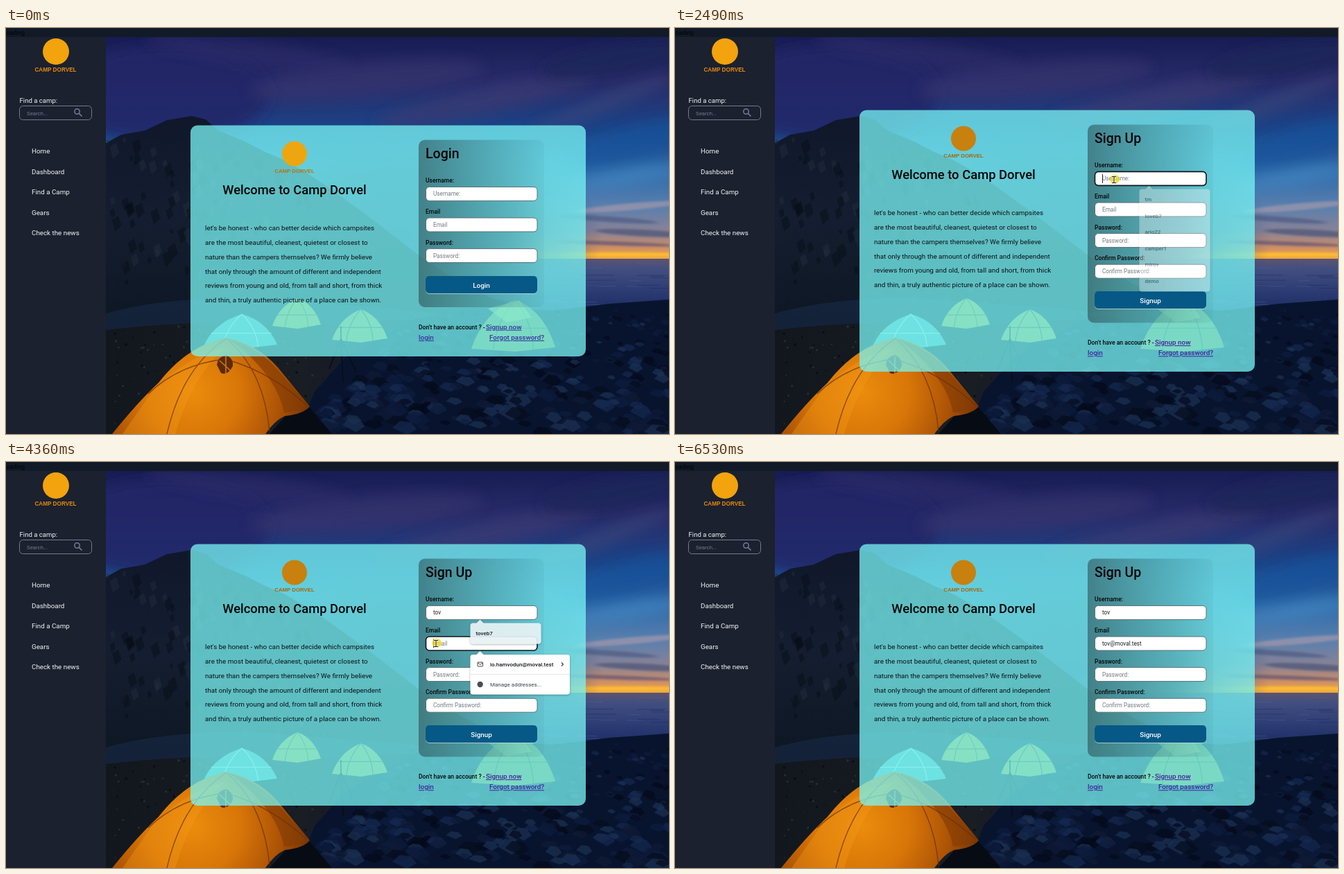
Write an HTML page that moves like this. It is 956 px wide and 586 px high and loops after 8 s.

```html
<!DOCTYPE html>
<html lang="en">
<head>
<meta charset="utf-8">
<title>Camp login</title>
<style>
html, body { margin: 0; width: 100%; height: 100%; overflow: hidden; background: #111a26; }
svg { display: block; width: 956px; height: 586px; }
text { font-family: Roboto, "Open Sans", sans-serif; white-space: pre; }
.mark { font-family: "Liberation Sans", Arial, sans-serif; font-weight: 700; }
</style>
</head>
<body>
<svg viewBox="0 0 956 586" xmlns="http://www.w3.org/2000/svg">
  <defs>
    <linearGradient id="sky" x1="0" y1="13" x2="0" y2="333" gradientUnits="userSpaceOnUse">
      <stop offset="0" stop-color="#171c54"/><stop offset=".2" stop-color="#282c69"/>
      <stop offset=".42" stop-color="#1b4488"/><stop offset=".6" stop-color="#2c68a8"/>
      <stop offset=".76" stop-color="#587fae"/><stop offset=".88" stop-color="#8b8296"/>
      <stop offset=".95" stop-color="#cf8f66"/><stop offset="1" stop-color="#f2aa38"/>
    </linearGradient>
    <linearGradient id="sea" x1="0" y1="333" x2="0" y2="430" gradientUnits="userSpaceOnUse">
      <stop offset="0" stop-color="#5d5470"/><stop offset=".15" stop-color="#414e80"/>
      <stop offset=".55" stop-color="#283870"/><stop offset="1" stop-color="#132150"/>
    </linearGradient>
    <radialGradient id="haze">
      <stop offset="0" stop-color="#24406e"/><stop offset=".55" stop-color="#24406e" stop-opacity=".85"/>
      <stop offset="1" stop-color="#24406e" stop-opacity="0"/>
    </radialGradient>
    <linearGradient id="hill" x1="0" y1="127" x2="0" y2="420" gradientUnits="userSpaceOnUse">
      <stop offset="0" stop-color="#10172a"/><stop offset=".5" stop-color="#141e30"/><stop offset="1" stop-color="#0d1724"/>
    </linearGradient>
    <linearGradient id="ground" x1="144" y1="0" x2="620" y2="0" gradientUnits="userSpaceOnUse">
      <stop offset="0" stop-color="#12171e"/><stop offset=".6" stop-color="#191d24"/><stop offset="1" stop-color="#0a1430"/>
    </linearGradient>
    <radialGradient id="glow" cx="270" cy="525" r="170" gradientUnits="userSpaceOnUse">
      <stop offset="0" stop-color="#ec8c0c"/><stop offset=".4" stop-color="#d87608"/>
      <stop offset=".75" stop-color="#ab5206"/><stop offset="1" stop-color="#733206"/>
    </radialGradient>
    <linearGradient id="panel">
      <stop offset="0" stop-color="#2a4c52" stop-opacity=".58"/><stop offset=".55" stop-color="#2a5a60" stop-opacity=".3"/>
      <stop offset="1" stop-color="#2a5a60" stop-opacity=".06"/>
    </linearGradient>
    <filter id="soft" x="-30%" y="-60%" width="160%" height="220%"><feGaussianBlur stdDeviation="9"/></filter>
    <filter id="thin" x="-20%" y="-150%" width="140%" height="400%"><feGaussianBlur stdDeviation="4 1.5"/></filter>
    <filter id="shade" x="-10%" y="-20%" width="120%" height="150%"><feDropShadow dx="0" dy="1" stdDeviation="1.5" flood-opacity=".35"/></filter>
    <clipPath id="view"><rect x="144" y="13" width="812" height="573"/></clipPath>
  </defs>
  <rect width="956" height="586" fill="#111a26"/>
  <g id="photo" clip-path="url(#view)"></g>
  <g id="side"></g>
  <g id="ui"></g>
</svg>
<script>
const LOOP = 8000;
const $ = id => document.getElementById(id);
const clamp = v => Math.max(0, Math.min(1, v));

let seed = 11;
const rnd = (a = 0, b = 1) => {
  seed = (seed * 16807) % 2147483647;
  return a + (b - a) * seed / 2147483647;
};

const rect = (x, y, w, h, r, fill, extra = '') =>
  `<rect x="${x}" y="${y}" width="${w}" height="${h}" rx="${r}" fill="${fill}" ${extra}/>`;
const path = (d, fill, extra = '') => `<path d="${d}" fill="${fill}" ${extra}/>`;
const line = (d, color, w = 1, extra = '') => path(d, 'none', `stroke="${color}" stroke-width="${w}" ${extra}`);
const circle = (x, y, r, fill, extra = '') => `<circle cx="${x}" cy="${y}" r="${r}" fill="${fill}" ${extra}/>`;
const text = (x, y, size, str, fill = '#06090c', extra = '') =>
  `<text x="${x}" y="${y}" font-size="${size}" fill="${fill}" ${extra}>${str}</text>`;
const MID = 'text-anchor="middle"', BOLD = 'font-weight="500"';

// ---------- scenery ----------
const cloud = (x, y, rx, ry, fill, op, turn = 0, blur = 'soft') =>
  `<ellipse cx="${x}" cy="${y}" rx="${rx}" ry="${ry}" fill="${fill}" opacity="${op}" transform="rotate(${turn} ${x} ${y})" filter="url(#${blur})"/>`;

function tent(x, y, w, h, fill, seam) {
  const m = x + w * .52, b = y + h;
  return path(`M${x} ${b - 4}Q${x + w * .14} ${y + h * .25} ${m} ${y}Q${x + w * .86} ${y + h * .2} ${x + w} ${b - 6}L${m} ${b}Z`, fill)
    + line(`M${m} ${y}Q${x + w * .3} ${y + h * .4} ${x + w * .26} ${b - 2}M${m} ${y}Q${x + w * .72} ${y + h * .4} ${x + w * .74} ${b - 3}M${x + w * .1} ${y + h * .55}H${x + w * .92}`, seam, 1.2);
}

function stones(n, x0, x1, top, bottom, tones) {
  let out = '';
  for (let i = 0; i < n; i++) {
    const k = i / n, y = top + (bottom - top) * k + rnd(-5, 5);
    const left = Math.max(x0, 590 - (y - 405) * .9), x = rnd(left, x1);
    const w = (5 + 12 * k) * rnd(.5, 1.2), h = w * rnd(.4, .7);
    out += path(`M${x - w} ${y}L${x - w * .4} ${y - h}L${x + w * .5} ${y - h * .8}L${x + w} ${y + h * .2}L${x + w * .2} ${y + h}Z`,
      tones[Math.floor(rnd(0, tones.length))], 'opacity=".7"');
  }
  return out;
}

function photo() {
  let s = rect(144, 13, 812, 322, 0, 'url(#sky)');
  s += cloud(230, 95, 150, 70, '#222867', .85) + cloud(350, 35, 150, 16, '#302f6c', .55, 8)
    + cloud(520, 75, 170, 24, '#373470', .6, -6) + cloud(690, 105, 160, 18, '#3d3b72', .65, -12)
    + cloud(880, 45, 110, 22, '#1e2859', .8, -10) + cloud(860, 110, 110, 12, '#40487c', .5, -22)
    + cloud(900, 165, 90, 22, '#17529c', .7, -16) + cloud(900, 215, 80, 12, '#4385c0', .7, -10);
  s += cloud(900, 258, 80, 5, '#a398ac', .7, -5, 'thin') + cloud(870, 276, 70, 4, '#535f85', .8, 4, 'thin')
    + cloud(920, 296, 70, 5, '#555c7c', .85, 3, 'thin') + cloud(880, 311, 90, 3, '#6c5a70', .8, 2, 'thin')
    + cloud(890, 327, 120, 3, '#ffbe36', .9, 0, 'thin');
  s += rect(500, 333, 456, 100, 0, 'url(#sea)');
  for (let i = 0; i < 40; i++) {
    const x = rnd(700, 940), y = rnd(340, 405);
    s += line(`M${x} ${y}h${rnd(14, 50)}`, i % 2 ? '#53669e' : '#18264f', 1, 'opacity=".4"');
  }
  s += '<ellipse cx="570" cy="300" rx="290" ry="165" fill="url(#haze)"/>';
  s += path('M144 166L166 154L200 148L232 133L268 127L288 132L306 148L345 164L372 178L402 191L435 210L462 228L520 270L594 327L640 358L700 390L740 400V586H144Z', 'url(#hill)');
  for (let i = 0; i < 130; i++) {
    const x = rnd(144, 470), y = Math.max(150, 140 + Math.max(0, x - 300) * .72) + rnd(8, 220), w = rnd(3, 10);
    s += path(`M${x} ${y}l${w} ${-w * .7}l${w * .5} ${w * 1.6}l${-w} ${w * .9}Z`, i % 3 ? '#080d18' : '#222c3c', 'opacity=".5"');
  }
  s += path('M144 412Q230 388 350 390L560 405L680 420V440H144Z', '#16253e', 'opacity=".85"')
    + path('M144 436Q270 420 430 428L640 418V586H144Z', 'url(#ground)');
  for (let i = 0; i < 160; i++) {
    s += circle(rnd(146, 470).toFixed(1), rnd(430, 582).toFixed(1), rnd(.6, 2).toFixed(1), i % 2 ? '#2b2c2f' : '#090d14');
  }
  s += path('M420 586L445 525L490 475L590 420L680 402L790 408L870 398L956 392V586Z', '#08142e');
  s += stones(360, 430, 956, 410, 582, ['#142850', '#0d1c3e', '#060c1c', '#1b3052', '#04091a', '#0f1a36']);
  s += tent(285, 413, 106, 50, '#50a9a8', '#b7e2ca') + tent(384, 390, 70, 44, '#b0a02c', '#565c18')
    + tent(470, 406, 80, 48, '#a4a03a', '#414a20') + tent(671, 392, 121, 75, '#7e8430', '#36481c');
  s += path('M695 405L740 393L758 418L722 425Z', '#c5c04a', 'opacity=".7"');
  s += line('M483 448L466 492M483 448L486 512M483 448L505 497M483 448V430', '#080c16', 1.6);
  s += path('M380 586L405 558L438 548L470 586Z', '#060b14')
    + path('M153 586Q190 540 220 512Q262 458 318 447Q362 456 392 490L438 546Q430 557 402 560Q388 566 374 586Z', 'url(#glow)')
    + path('M322 449Q366 462 394 496L436 545Q422 553 401 555Q390 500 322 449Z', '#843c06', 'opacity=".65"')
    + path('M210 526Q262 472 316 462Q270 500 244 586H168Z', '#f49a18', 'opacity=".35"')
    + line('M318 448Q254 490 232 586M320 450Q372 496 380 582M205 528Q250 485 316 478Q380 495 434 545', '#6a2f06', 1.4, 'opacity=".7"')
    + path('M304 486Q306 474 317 472Q328 476 327 488Q320 502 310 498Z', '#5c2a08')
    + line('M317 474V500M308 480L324 495', '#d07a14', 1.5);
  return s;
}

// ---------- sidebar ----------
function side() {
  let s = rect(0, 13, 144, 573, 0, '#1b212e') + text(-2, 10, 8.9, 'loading', '#02050a')
    + circle(72, 34, 19, '#f2a30e')
    + text(71.5, 62.5, 8.2, 'CAMP DORVEL', '#e2890f', MID + ' class="mark"')
    + text(19.5, 108, 9.6, 'Find a camp:', '#f4f5f7')
    + rect(19.5, 112.5, 104, 20, 5, '#1b212e', 'stroke="#747b8c"')
    + text(30, 125.5, 7.8, 'Search...', '#727a90')
    + circle(102.5, 120.5, 3.7, 'none', 'stroke="#757a9c" stroke-width="1.5"')
    + line('M105.3 123.3L109.5 127.5', '#757a9c', 1.7);
  ['Home', 'Dashboard', 'Find a Camp', 'Gears', 'Check the news'].forEach((item, i) => {
    s += text(37, 181 + i * 29.5, 9.8, item, '#f4f5f7');
  });
  return s;
}

// ---------- card ----------
const COPY = [
  "let's be honest - who can better decide which campsites",
  'are the most beautiful, cleanest, quietest or closest to',
  'nature than the campers themselves? We firmly believe',
  'that only through the amount of different and independent',
  'reviews from young and old, from tall and short, from thick',
  'and thin, a truly authentic picture of a place can be shown.'
];
const FIELDS = ['Username:', 'Email', 'Password:', 'Confirm Password:'];

function field(i, y, value, focus) {
  const top = y + i * 44.6, name = FIELDS[i];
  return text(605, top - 5.5, 8.5, name, '#050708', BOLD)
    + rect(605.5, top + .5, 160.5, 20, 5, '#fff', focus ? 'stroke="#0f171c" stroke-width="1.6"' : 'stroke="#587078"')
    + text(616, top + 13.4, 8.2, value || name, value ? '#1b1f24' : '#72777f');
}

function card(signup, values, focus, hover) {
  const y = signup ? 118.5 : 140.5, h = signup ? 377.5 : 333.5, foot = signup ? 22.4 : 0;
  const link = (x, ly, str, fill = signup ? '#42219c' : '#37349c') =>
    text(x, ly, 9.9, str, fill, BOLD + ' text-decoration="underline"');
  let s = rect(266, y, 570, h, 10, 'rgb(120,246,246)', 'fill-opacity=".75"')
    + circle(416, y + 41, 18, signup ? '#c8800f' : '#eda60f')
    + text(416, y + 68, 7.8, 'CAMP DORVEL', signup ? '#a5670f' : '#b8740f', MID + ' class="mark"')
    + text(416, y + 99.5, 18.4, 'Welcome to Camp Dorvel', '#050708', MID + ' ' + BOLD);
  COPY.forEach((row, i) => { s += text(287, y + 151.5 + i * 20.85, 9.9, row, '#0a1114'); });
  s += rect(595, y + 21, 181, signup ? 286 : 241.5, 9, 'url(#panel)')
    + text(605, y + 47, 19.5, signup ? 'Sign Up' : 'Login', '#050708', BOLD);
  for (let i = 0; i < (signup ? 4 : 3); i++) s += field(i, y + 88.4, values[i], focus === i);
  const by = signup ? 380 : 358;
  s += rect(605, by + .8, 161, 25, 5, '#c3dde2') + rect(605, by, 161, 25, 5, '#065987')
    + text(685.5, by + 16.5, 9.9, signup ? 'Signup' : 'Login', '#fff', MID + ' ' + BOLD);
  s += text(595, 434.5 + foot, 8.6, "Don't have an account ? -", '#050708', BOLD)
    + link(692, 434.7 + foot, 'Signup now', hover ? '#f4f6c6' : undefined)
    + link(595, 450 + foot, 'login') + link(697, 450 + foot, 'Forgot password?');
  return s;
}

// ---------- popups ----------
function bubble(x, y, w, h, op, fill, inner) {
  return `<g opacity="${op}"><g filter="url(#shade)">${rect(x, y, w, h, 4, fill)}${path(`M678 ${y + .5}L683.5 ${y - 5}L689 ${y + .5}Z`, fill)}</g>${inner}</g>`;
}
function nameList(rows, op, fill = '#fff') {
  const inner = rows.map((r, i) => text(677.5, 250 + i * 23.6, 8, r, '#15181c', BOLD)).join('');
  return bubble(669.5, 232.5, 102, 30 + (rows.length - 1) * 23.6, op, fill, inner);
}
function mailList(op) {
  return bubble(669.5, 278, 143.5, 57.5, op, '#fff',
    rect(680, 289, 7.5, 6, 1, 'none', 'stroke="#444"') + line('M680 289.5L683.7 292.5L687.5 289.5', '#444')
    + text(698, 294.7, 8, 'lo.hamvodun@moval.test', '#15181c', BOLD)
    + line('M801 289.5L803.5 292L801 294.5', '#333', 1.1) + line('M669.5 306.5H813', '#e3e6e8')
    + circle(683.7, 321, 4.2, '#4a4d50') + text(698, 323.8, 8, 'Manage addresses...', '#3a3e42'));
}

// ---------- pointer ----------
const along = (t, t0, t1, n) => clamp((Math.floor((t - t0) / ((t1 - t0) / (n - 1)) + 1e-6) + 1) / n);
const ease = p => p * p * (3 - 2 * p);
const bend = (p, a, c, b) => [0, 1].map(i => (1 - p) ** 2 * a[i] + 2 * p * (1 - p) * c[i] + p * p * b[i]);

const LINK = [716, 430], NAME = [633, 219], MAIL = [620, 262], REST = [633, 284];

function pointer(t) {
  if (t < 660 || t >= 5930) return null;
  if (t < 1680) return bend(ease(along(t, 660, 1150, 8)), [896, 580], [800, 490], LINK);
  if (t < 3700) return bend(ease(along(t, 1680, 2360, 11)), LINK, [588, 270], NAME);
  if (t < 5310) return bend(ease(along(t, 3700, 4230, 8)), NAME, [606, 245], MAIL);
  if (t < 5450) return bend(along(t, 5310, 5380, 2), MAIL, [628, 276], REST);
  return bend(ease(along(t, 5450, 5860, 7)), REST, [400, 310], [98, 320]);
}

function drawPointer([x, y], kind) {
  const at = `transform="translate(${x.toFixed(1)} ${y.toFixed(1)})"`;
  if (kind === 'beam') {
    const d = 'M-3 -4.5H3M0 -4.5V4.5M-3 4.5H3';
    return `<g ${at}>${line(d, '#fff', 2.4)}${line(d, '#222', 1.1)}</g>`;
  }
  const d = kind === 'hand'
    ? 'M0 0Q1.5 -1 2 .8V4L6 5Q7 5.5 6.6 8L5.5 10.5H1.3L-1.6 6.6Q-1.8 5 0 6Z'
    : 'M0 0V9L2.1 7.2L3.6 10.4L5.2 9.7L3.7 6.5L6.6 6.3Z';
  return path(d, '#fff', `stroke="#111" stroke-width=".8" ${at}`);
}

// ---------- timeline ----------
const SAVED = ['tm', 'toveb7', 'arlo22', 'camper1', 'mirov', 'demo'];
const within = (t, a, b) => t >= a && t < b;

function scene(t) {
  const signup = t >= 1490;
  const name = t < 3210 ? '' : t < 3540 ? 't' : t < 3620 ? 'to' : 'tov';
  const mail = t < 5310 ? '' : 'tov@moval.test';
  const focus = t < 2490 ? -1 : t < 4360 ? 0 : t < 6460 ? 1 : -1;
  const p = pointer(t);
  const overLink = !signup && p && p[0] < 744 && p[1] < 437;

  let s = card(signup, [name, mail], focus, overLink);

  if (focus === 0 && !within(t, 3010, 3210)) {
    const x = 616.5 + [0, 4.2, 7.6, 11.6][name.length];
    s += line(`M${x} 211V224`, '#222');
  }
  if (focus === 1 && !within(t, 4920, 5310)) s += line(`M${mail ? 675.5 : 616.5} 255.5V268`, '#222');

  if (within(t, 4360, 5930)) s += mailList(t < 5860 ? 1 : .5);
  if (within(t, 2490, 3210)) s += nameList(SAVED, t < 2555 ? .35 : t < 2620 ? .75 : 1);
  else if (within(t, 3210, 3540)) s += nameList(SAVED.slice(0, 2), 1);
  else if (within(t, 3540, 4360)) s += nameList(SAVED.slice(1, 2), 1);
  else if (within(t, 4360, 4590)) s += nameList(SAVED.slice(1, 2), t < 4450 ? .92 : t < 4520 ? .55 : .25, '#e8f3f5');

  if (p) {
    const click = within(t, 1350, 1490) || within(t, 2490, 2620) || within(t, 4360, 4520);
    if (click) s += circle(p[0] + 1, p[1] - .7, 6.8, '#ecdc22', 'opacity=".8"');
    const inField = signup && p[0] > 605 && p[0] < 766 && [207, 251, 296, 341].some(y => p[1] > y && p[1] < y + 21);
    s += drawPointer(p, overLink ? 'hand' : inField ? 'beam' : 'arrow');
  }
  return s;
}

$('photo').innerHTML = photo();
$('side').innerHTML = side();

let last = '';
function frame() {
  const next = scene(performance.now() % LOOP);
  if (next !== last) $('ui').innerHTML = last = next;
  requestAnimationFrame(frame);
}
frame();
</script>
</body>
</html>
```
